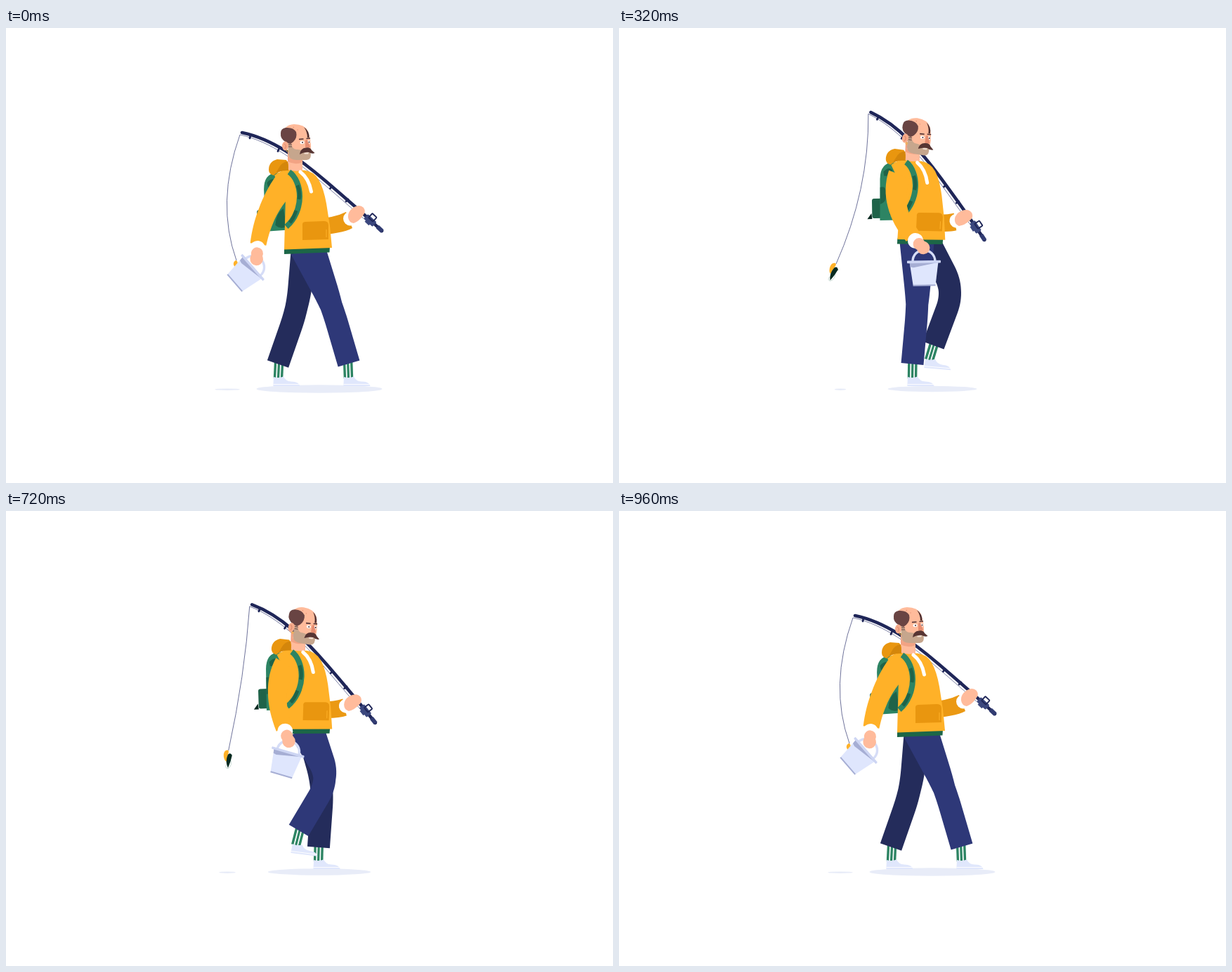
An HTML page for the animation above (1 s loop, 864x648 px).

```html
<!DOCTYPE html>
<html lang="en">
<head>
<meta charset="utf-8">
<title>Walking angler</title>
<style>
  html, body { margin: 0; width: 100%; height: 100%; overflow: hidden; background: #fff; }
  svg { display: block; width: 100vw; height: 100vh; }
</style>
</head>
<body>
<svg viewBox="0 0 864 648" fill="none">
  <g fill="#e8ecf8">
    <ellipse id="shadow" cx="446" cy="514"/>
    <ellipse id="lureShadow" cx="315" cy="514.7" ry="1.2"/>
  </g>

  <path id="line" stroke="#4a4f80" stroke-width=".8"/>
  <g id="lure">
    <path d="M6 10Q12 18 8 24Q4 27 3 21" stroke="#b9cfc8" stroke-width=".7"/>
    <path fill="#ffb128" d="M-2 0Q-7 2 -4 10Q-1 16 2 16L1 4Q1 -1 -2 0Z"/>
    <path fill="#062a20" d="M1 6Q3 1 7 5Q8 15 7 24Q0 17 1 6Z"/>
  </g>

  <g id="rod">
    <path stroke="#4a4f80" stroke-width=".7" d="M333 152C378 162 417 192 452 222S500 264 510 272"/>
    <path stroke="#1f2658" stroke-width="4.6" stroke-linecap="round" d="M336 149C380 158 420 188 455 218S515 270 535 289"/>
    <path stroke="#1f2658" stroke-width="2.8" stroke-linecap="round" d="M348 153L347 157M389 171L387 175.500M464 225L461.500 228.500M487 244L484 247"/>
    <g transform="translate(519 274) rotate(43)">
      <rect x="-9" y="-4" width="17" height="9" rx="1.500" fill="#3b477e"/>
      <rect x="-5" y="4" width="8" height="3" fill="#3b477e"/>
      <rect x="-5" y="-9" width="8.500" height="8" rx="1" stroke="#1f2658" stroke-width="1.900"/>
      <rect x="13" y="-3" width="10" height="6" rx="1" fill="#323c72"/>
    </g>
    <path fill="#eb9913" d="M440 272Q468 270 484 262L493 285Q478 293 440 295Z"/>
    <circle cx="490" cy="271.500" r="10" fill="#fff"/>
    <path fill="#ffbb9b" d="M487 270Q486 262 494 256Q503 250 509 256Q513 262 508 267Q503 275 495 278Q488 277 487 270Z"/>
  </g>

  <g id="farLeg"></g>
  <g id="nearLeg"></g>

  <g id="torso">
    <g transform="rotate(-3.7 428 320) translate(0 1)">
      <path fill="#0b2a22" d="M354 283L360 275L361 283Z"/>
      <rect x="361" y="254" width="18" height="28" rx="3" fill="#1f6349"/>
      <path fill="#2d8463" d="M372 285L373 226Q374 203 392 203L408 203L412 285Z"/>
      <path fill="#1f6349" d="M373 238q9 -3 8 9q2 12 -8.300 15zM386 277q2 -17 13 -23l3 26q-9 4 -16 -3zM378 216q8 -8 13 -2q-2 9 -12 8z"/>
    </g>
    <path fill="#f2a384" d="M401 176V199Q410 207 422 202V180Z"/>
    <path fill="#ffbb9b" d="M401 190Q412 196 422 191V204H401Z"/>
    <path fill="#1c6647" d="M396 314L461 311L460.500 319.500L396 322Z"/>
    <path fill="#ffb128" d="M382 210Q392 202 402 202Q412 205 424 202.500Q438 204 445 216Q452 228 456 250L461 282L464 313L396 315.500L398 240Z"/>
    <path stroke="#fff" stroke-width="5" stroke-linecap="round" d="M419 205Q431 214 434.500 233"/>
    <path fill="#e9960f" d="M426 276L453 275Q459 275 459 281V301L422 302V282Q421 276 426 276Z"/>
    <path stroke="#ffb128" stroke-width="1" d="M456 287V298"/>
    <path stroke="#2d8463" stroke-width="8" d="M403 205C412 211 418 225 418 240S412 272 399 283"/>
    <path stroke="#1f6349" stroke-width="5" d="M415 224Q419 234 417 244M413 260Q409 272 404 277"/>
    <path fill="#e9960f" d="M374 202Q374 190 386 187L399 188Q404 195 401 203Q388 203 381 210Q374 208 374 202Z"/>
    <path fill="#d4860b" d="M388 200Q392 191 401 190L402 203Q392 202 384 207Z"/>
  </g>

  <g id="head">
    <path fill="#ffbb9b" d="M394 152Q395 138 410 137Q425 137 430 147L433 158L434 166Q435 188 418 187L402 183V168Z"/>
    <path fill="#c6a68d" d="M401 163L406 165Q408 174 415 173L433 176Q436 187 428 188H414Q403 188 402 180Z"/>
    <path fill="#694443" d="M391 150Q391 143 398 142Q409 141 413 148Q415 156 409 162L405 165L399 163Q390 158 391 150Z"/>
    <path fill="#4c2f31" d="M424 141Q432 147 431.500 156L429 156Q429 148 424 141Z"/>
    <path stroke="#694443" stroke-width="1" d="M402 166h5M402 169h5"/>
    <ellipse cx="397.500" cy="168" rx="4.500" ry="6.500" fill="#f6ab8b"/>
    <path stroke="#d98468" stroke-width="1" d="M396 165q4 2 1 7"/>
    <circle cx="400.500" cy="175" r="1.300" stroke="#f2b83a" stroke-width=".8"/>
    <path stroke="#4c2f31" stroke-width="1.600" d="M417 158.500L423.500 158M427.500 157.500L433 157"/>
    <ellipse cx="421.500" cy="163" rx="3" ry="2.200" fill="#fff"/>
    <ellipse cx="431" cy="162.500" rx="2.200" ry="2.200" fill="#fff"/>
    <path fill="#e68d71" d="M426 160L428.500 159L433 169Q431 172 426 170Z"/>
    <g fill="#4c2f31"><circle cx="422" cy="163" r="1"/><circle cx="431.500" cy="162.500" r="1"/></g>
    <path fill="#f1dfd3" d="M424 178L431 177L430 179.500H425Z"/>
    <path fill="#573533" d="M418 180Q419 171 427 170.500Q433 169.500 435 174L439.500 178Q436 180 431 177Q426 176 418 180Z"/>
    <path fill="#e9957a" d="M408 141.500l2 -1l0 2zM414 145l1.500 -1v2z"/>
  </g>

  <path id="sleeve" fill="#ffb128"/>
  <g id="bucket">
    <path stroke="#d6ddf7" stroke-width="3.400" d="M-16 0C-16 -22 16 -22 16 0"/>
    <path fill="#dfe6fd" d="M-20.500 0H20.500L16 33H-16Z"/>
    <path fill="#a6aed4" d="M-20.500 1H20.500L-15 8L-19.500 7Z"/>
    <rect x="-24" y="-1.800" width="48" height="3.600" rx="1" fill="#cdd5f3"/>
    <rect x="-16" y="32.500" width="32" height="2" fill="#a6aed4"/>
  </g>
  <g id="hand">
    <circle r="11" fill="#fff"/>
    <g fill="#ffbb9b"><circle cy="7" r="8.600"/><circle cy="15" r="9.300"/></g>
  </g>
</svg>

<script>
const TAU = Math.PI * 2;
const el = id => document.getElementById(id);
const set = (id, name, value) => el(id).setAttribute(name, value);
const place = (id, x, y, turn = 0) => set(id, 'transform', `translate(${x} ${y}) rotate(${turn})`);
const mix = (a, b, t) => a.map((v, i) => v + (b[i] - v) * t);

// Smooth periodic curve through six evenly spaced keys
function wave(keys, p) {
  return keys.reduce((sum, key, i) => {
    const a = TAU * (p - i / 6);
    return sum + key * (1 + 2 * Math.cos(a) + 2 * Math.cos(2 * a) + Math.cos(3 * a)) / 6;
  }, 0);
}

// Periodic cubic with local support, keeps planted feet still
function spline(keys, p) {
  const s = (p % 1) * 6, i = Math.floor(s), t = s - i;
  const [a, b, c, d] = [-1, 0, 1, 2].map(k => keys[(i + k + 6) % 6]);
  return b + t / 2 * (c - a + t * (2 * a - 5 * b + 4 * c - d + t * (3 * (b - c) + d - a)));
}

// Tapered limb from a to b, bent around c; r is the share of the limb that bends
function limb(a, c, b, r, [w0, w1, w2]) {
  const from = mix(c, a, r), to = mix(c, b, r);
  const left = [], right = [];
  const add = (pt, u, v, s) => {
    const w = s < .5 ? w0 + (w1 - w0) * s * 2 : w1 + (w2 - w1) * (s * 2 - 1);
    const dx = v[0] - u[0], dy = v[1] - u[1], k = w / Math.hypot(dx, dy);
    left.push([pt[0] + dy * k, pt[1] - dx * k]);
    right.unshift([pt[0] - dy * k, pt[1] + dx * k]);
  };
  add(a, a, c, 0);
  for (let t = 0; t <= 1; t += 1 / 16) {
    const u = mix(from, c, t), v = mix(c, to, t);
    add(mix(u, v, t), u, v, (1 - r) / 2 + r * t);
  }
  add(b, c, b, 1);
  return 'M' + left.concat(right).map(q => q.map(v => v.toFixed(2)).join(' ')).join('L') + 'Z';
}

const legs = {
  nearLeg: {
    color: '#2e3878',
    widths: [25, 16, 16],
    hip: [429, 429, 424, 424, 425, 429],
    knee: [[464, 470, 425, 412, 434, 476], [396, 391, 395, 398, 396, 374]],
    ankle: [[488, 466.5, 417.5, 388.5, 397, 444], [478, 478, 478.5, 478.5, 465, 450]],
    foot: [[480, 460, 410, 381, 384.5, 435], [510, 510, 510, 510, 497, 482], [0, 0, 0, 0, 9, 4]]
  },
  farLeg: {
    color: '#242c5b',
    widths: [19, 16, 16],
    hip: [425, 431, 436, 438, 436, 426],
    knee: [[415, 437, 477, 463, 472, 423], [398, 389, 373, 398, 393, 395]],
    ankle: [[387, 396, 447.5, 485.5, 469, 419.5], [478.5, 461, 452, 479, 479, 479]],
    foot: [[380, 383, 434, 478, 462, 412], [510, 494, 484, 510, 510, 510], [0, 9, 5, 0, 0, 0]]
  }
};

for (const id in legs) {
  el(id).innerHTML = `
    <path id="${id}Sock" stroke="#2d8463" stroke-width="13.500"/>
    <path id="${id}Stripes" stroke="#fff" stroke-width="1.700"/>
    <g id="${id}Shoe">
      <path fill="#e0e7fc" d="M1 -13Q8 -11 15 -13.500Q18 -7 26 -6.500Q37 -6.500 38.500 0H.3Z"/>
      <path stroke="#fff" stroke-width=".9" d="M.5 -2.500H38"/>
    </g>
    <path id="${id}Cloth" fill="${legs[id].color}"/>`;
}

function drawLeg(id, p, bob) {
  const { widths, hip, knee, ankle, foot } = legs[id];
  const h = [wave(hip, p), 313 + bob];
  const k = knee.map(v => wave(v, p));
  const a = [wave(ankle[0], p), Math.min(479, spline(ankle[1], p))];
  const heel = [wave(foot[0], p), Math.min(510, spline(foot[1], p))];
  const turn = spline(foot[2], p);
  const top = mix(a, k, .06), base = [heel[0] + 7.5, heel[1] - 11];
  const strip = d => `M${top[0] + d} ${top[1]}L${base[0] + d} ${base[1]}`;
  set(id + 'Cloth', 'd', limb(h, k, a, .35, widths));
  set(id + 'Sock', 'd', strip(0));
  set(id + 'Stripes', 'd', strip(-2.5) + strip(2.5));
  place(id + 'Shoe', ...heel, turn);
}

function draw(p) {
  const at = (...keys) => wave(keys, p);
  const bob = at(0, 3, -13, -1, 6.5, -12);
  const lean = 1.85 * (1 - Math.cos(TAU * p));

  const spread = at(89.5, 76, 63.5, 79.5, 88, 65);
  set('shadow', 'rx', spread);
  set('shadow', 'ry', spread * .065);
  set('lureShadow', 'rx', (spread - 41) * .37);

  // Rod, hand and forearm swing as one piece around the grip
  const grip = [at(536, 533, 521, 517, 520, 533), at(290, 299, 303, 319, 322, 285)];
  const swing = at(0, 3, 13.2, 16, 13.6, 3.5);
  set('rod', 'transform', `translate(${grip}) rotate(${swing}) translate(-536 -290)`);

  const rad = swing * Math.PI / 180, cos = Math.cos(rad), sin = Math.sin(rad);
  const tip = [grip[0] - 203 * cos + 138 * sin, grip[1] - 203 * sin - 138 * cos];
  const bend = [at(298.5, 319, 356, 366, 356, 320), at(249, 238, 230, 240, 243, 232)];
  const end = [at(328, 325, 309, 304, 309, 324), at(331, 338, 336, 330, 336, 341)];
  set('line', 'd', `M${tip}Q${bend} ${end}`);
  place('lure', ...end, at(-12, 0, 36, 48, 36, 0));

  drawLeg('farLeg', p, bob);
  drawLeg('nearLeg', p, bob);

  set('torso', 'transform', `translate(0 ${bob}) rotate(${lean} 428 320)`);
  set('head', 'transform',
    `translate(${at(0, 2, 6.3, 8.4, 6.3, 3)} ${at(0, 5, -9, 0, 9, -9)}) rotate(${at(0, 7, 9, 5, 9, 7)} 412 190)`);

  const shoulder = [at(397, 398, 400, 403, 400, 398), at(222, 225, 209, 219, 227, 211)];
  const elbow = [at(367, 367.5, 383, 383, 383, 368), at(259, 260, 251.5, 277, 270, 246)];
  const cuff = [at(358, 372.5, 422, 436, 423, 371.5), at(314, 320.5, 303, 311, 321.5, 305.5)];
  const wrist = [at(359, 372, 418, 431, 419, 372), at(308, 317, 297, 307, 317, 302)];
  set('sleeve', 'd', limb(shoulder, elbow, wrist, 1, [17, 13.5, 11.5]));
  place('hand', ...cuff, at(5, -2, -48, -50, -38, -3));
  place('bucket', at(351, 366, 434, 454, 435.5, 368), at(341, 349, 333, 338.5, 350, 335.5),
    at(49, 39, -1, -14, -4, 37));
}

const start = performance.now();
function tick() {
  const step = Math.floor(((performance.now() - start) % 1000) / 40);
  draw(step / 24);
  requestAnimationFrame(tick);
}
tick();
</script>
</body>
</html>
```
